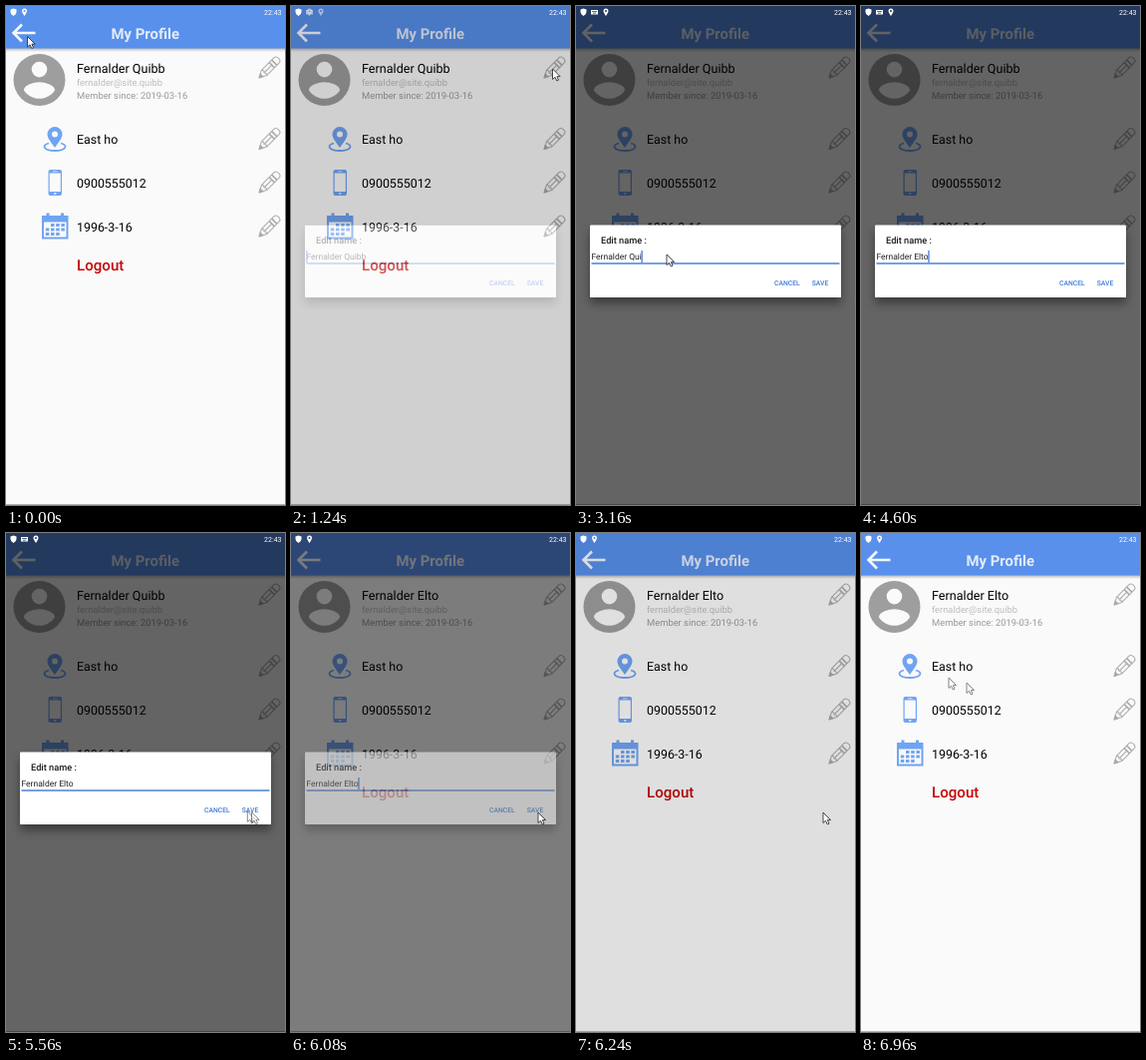
An HTML page that plays this animation: 280 px wide and 500 px high, repeating every 7000 ms.

```html
<!DOCTYPE html>
<html lang="en">
<head>
<meta charset="utf-8">
<title>My Profile</title>
<style>
  html, body { margin: 0; width: 100%; height: 100%; overflow: hidden; background: #fafafa; }
  svg { display: block; width: 280px; height: 500px; font-family: Roboto, sans-serif; text-rendering: geometricPrecision; }
  .row { font-size: 12.4px; }
  .button { font-size: 6.8px; font-weight: 500; fill: #3f7ad6; }
  #dialog .panel { filter: drop-shadow(0 6px 5px rgba(0, 0, 0, .4)); }
</style>
</head>
<body>
<svg viewBox="0 0 280 500">
  <defs>
    <linearGradient id="shade" x2="0" y2="1">
      <stop stop-color="#000" stop-opacity=".28"/>
      <stop offset="1" stop-color="#000" stop-opacity="0"/>
    </linearGradient>
    <g id="pencil" transform="rotate(-45)" fill="none" stroke="#adadad" stroke-width="1.1" stroke-linejoin="round">
      <path d="M-14 0L-7-3.7H10.5Q13.5-3.7 13.5 0T10.5 3.7H-7ZM-7-3.7Q-5-2-7 0Q-5 2-7 3.7M-6 0H4"/>
      <path d="M-14 0L-10.5-2V2Z" fill="#a2a2a2"/>
      <path d="M4-3.7V3.7M7.500-3.7V3.7" stroke-width="1.7"/>
    </g>
    <path id="pin" d="M0 4C-1.5 1.6-2.5.4-2.5-1A2.5 2.5 0 0 1 2.5-1C2.5.4 1.5 1.6 0 4ZM0-2A1 1 0 0 0 0 0A1 1 0 0 0 0-2Z" fill-rule="evenodd"/>
    <path id="arrow" d="M0 0V10.5L2.5 8.3L4.3 12L6 11.2L4.4 7.6H7.6Z" fill="#fff" stroke="#333" stroke-width=".9"/>
  </defs>

  <rect width="280" height="500" fill="#fafafa"/>
  <rect y="42" width="280" height="4" fill="url(#shade)"/>
  <rect width="280" height="42.500" fill="#5890ec"/>
  <path d="M29.500 27H8M16 18.500L7.500 27L16 35.500" fill="none" stroke="#f4f7fd" stroke-width="2.600"/>
  <text x="139.700" y="33" text-anchor="middle" font-size="14.9" font-weight="700" fill="#e3ebfa">My Profile</text>

  <path transform="translate(2.3 42.8) scale(2.6)" fill="#9e9e9e" d="M12 2a10 10 0 1 0 0 20a10 10 0 1 0 0-20zm0 3a3 3 0 1 1 0 6a3 3 0 1 1 0-6zm0 14.2c-2.5 0-4.7-1.3-6-3.2c0-2 4-3.1 6-3.1s6 1.1 6 3.1c-1.3 1.9-3.5 3.2-6 3.2z" fill-rule="evenodd"/>
  <text id="name" x="71" y="66.5" font-size="12.6"></text>
  <text x="71" y="80" font-size="9.3" fill="#bdbdbd">fernalder@site.quibb</text>
  <text x="71" y="93" font-size="9.4" fill="#9a9a9a">Member since: 2019-03-16</text>
  <text class="row" x="71" y="138.3">East ho</text>
  <text class="row" x="71" y="182.3">0900555012</text>
  <text class="row" x="71" y="226">1996-3-16</text>
  <text x="71" y="265" font-size="15.1" font-weight="500" fill="#c40808">Logout</text>

  <g fill="#70a4f3">
    <path d="M43 137.500C35 139.500 38 145 49 145S63 139.500 55 137.500" fill="none" stroke="#70a4f3" stroke-width="1.8"/>
    <path d="M49 142C44 135 41.500 132 41.500 128.500a7.500 7.500 0 0 1 15 0C56.500 132 54 135 49 142zM49 125.500a3 3 0 0 0 0 6a3 3 0 0 0 0-6z" fill-rule="evenodd"/>
    <rect x="42.500" y="164" width="13.500" height="26" rx="2"/>
    <path d="M43.700 167.500H54.800V186H43.700ZM47 165.500H51.500V166.300H47ZM48.200 187.200H50.300V188.800H48.200Z" fill="#fafafa"/>
    <path d="M40.500 207.500H43.500V210H55V207.500H58V210H62.500V233.500H36V210H40.500Z"/>
    <rect x="38" y="216.500" width="22.500" height="15" fill="#fafafa"/>
    <path d="M45 219.500H59M39.800 224H59M39.800 228.500H54" stroke="#70a4f3" stroke-width="2.800" stroke-dasharray="3.500 1.700"/>
  </g>
  <use href="#pencil" transform="translate(264 62)"/>
  <use href="#pencil" transform="translate(264 133.500)"/>
  <use href="#pencil" transform="translate(264 177)"/>
  <use href="#pencil" transform="translate(264 221)"/>
  <path d="M0 499.500H280" stroke="#b4b4b4"/>

  <g shape-rendering="crispEdges">
    <path id="dim" d="M0 0H280V500H0ZM14 220V292H266V220Z"/>
    <rect id="dimBehind" x="14" y="220" width="252" height="72"/>
  </g>

  <g fill="#fff">
    <path d="M7.500 2.500L10.500 3.600V6Q10.500 8.600 7.500 10Q4.500 8.600 4.500 6V3.600Z"/>
    <use id="pinNear" href="#pin" x="18.500" y="6"/>
    <g id="typing">
      <path d="M15 4H22V8.500H15ZM16 5.200V5.900H21V5.200ZM17 6.800V7.500H20V6.800Z" fill-rule="evenodd"/>
      <use href="#pin" x="30" y="6"/>
    </g>
    <text x="276.500" y="8.700" text-anchor="end" font-size="7">22:43</text>
  </g>

  <g id="dialog">
    <rect class="panel" x="14" y="219.500" width="252" height="72.500" rx="1" fill="#fff"/>
    <text x="25" y="237.500" font-size="9.250" font-weight="500" fill="#1c1c1c">Edit name :</text>
    <text id="field" x="15.500" y="254" font-size="8.500" fill="#222"></text>
    <path d="M15.500 258H264.500" stroke="#4a80d4" stroke-width="1.300"/>
    <rect id="caret" y="245" width="1.300" height="12" fill="#3f7ad6"/>
    <text class="button" x="199" y="280.300">CANCEL</text>
    <text class="button" x="236.700" y="280.300">SAVE</text>
  </g>

  <use id="trail" href="#arrow"/>
  <use id="pointer" href="#arrow"/>
</svg>
<script>
const LOOP = 7000, STEP = 40;
const OLD_NAME = 'Fernalder Quibb', NEW_NAME = 'Fernalder Elto';
const OPEN = 1172, CARET_CLICK = 2160, CLOSE = 6040;
const HIDE_POINTER = 3960, SHOW_POINTER = 4880;
const deletes = [2920, 3160, 3280, 3480, 3680];
const inserts = [3960, 4320, 4440, 4600];

// Pointer moves: start, end, target x and y, eased or linear
const home = [21.5, 30.5];
const moves = [
  [60, 900, 262.5, 63, true],
  [1500, 2140, 91, 249, true],
  [4900, 5600, 248, 280, true],
  [6360, 6680, 175, 206],
  [6680, 6920, 106, 150],
  [6920, 6960, 88, 145]
];

const $ = id => document.getElementById(id);
const ramp = (t, start, length) => Math.min(1, Math.max(0, (t - start) / length));
const smooth = p => p * p * (3 - 2 * p);
const opacity = (id, value) => $(id).setAttribute('opacity', value);

function pointerAt(t) {
  let [x, y] = home;
  for (const [start, end, toX, toY, eased] of moves) {
    let p = ramp(t, start, end - start);
    if (eased) p = smooth(p);
    x += (toX - x) * p;
    y += (toY - y) * p;
  }
  return [x, y];
}

function place(id, [x, y]) {
  $(id).setAttribute('transform', `translate(${x} ${y})`);
}

function drawField(t) {
  const removed = deletes.filter(at => at <= t).length;
  const added = inserts.filter(at => at <= t).length;
  const text = added
    ? NEW_NAME.slice(0, 10 + added)
    : OLD_NAME.slice(0, OLD_NAME.length - removed);
  const field = $('field');
  field.textContent = text.replace(/ $/, '\u00a0');

  const lastAction = [OPEN, CARET_CLICK, ...deletes, ...inserts].filter(at => at <= t).pop() || 0;
  const width = t < CARET_CLICK ? 0 : field.getComputedTextLength();
  $('caret').setAttribute('x', 15.2 + width);
  opacity('caret', (t - lastAction) % 1000 < 500 ? 1 : 0);
}

function drawPointer(t) {
  const now = pointerAt(t), before = pointerAt(Math.max(0, t - STEP));
  const moving = Math.hypot(now[0] - before[0], now[1] - before[1]) > 2;
  const visible = t < HIDE_POINTER || t >= SHOW_POINTER;
  place('pointer', now);
  place('trail', before);
  opacity('pointer', visible ? (moving ? .65 : 1) : 0);
  opacity('trail', visible && moving ? .65 : 0);
}

function draw(time) {
  const t = Math.floor(time % LOOP / STEP) * STEP;
  const dim = .6 * (ramp(t, OPEN, 240) - ramp(t, CLOSE, 245));
  opacity('dim', dim);
  // The page behind the panel stays bright until the panel covers it
  opacity('dimBehind', t < CLOSE ? 0 : dim);
  opacity('dialog', ramp(t, OPEN, 225) * (1 - ramp(t, CLOSE, 85)));

  const typing = ramp(t, 1180, 120) - ramp(t, 5880, 120);
  opacity('typing', typing);
  opacity('pinNear', 1 - typing);

  $('name').textContent = t < CLOSE ? OLD_NAME : NEW_NAME;
  drawField(t);
  drawPointer(t);
}

const began = performance.now();
function tick() {
  draw(performance.now() - began);
  requestAnimationFrame(tick);
}
tick();
</script>
</body>
</html>
```
